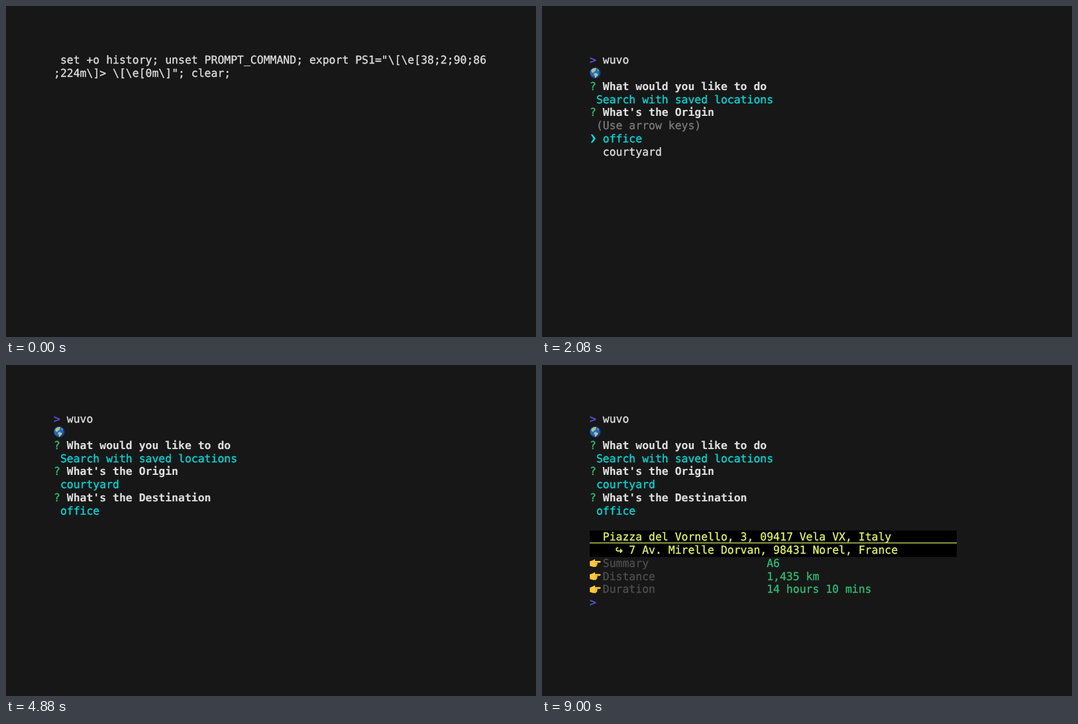
Write an HTML page that moves like this. It is 800 px wide and 500 px high and loops after 9180 ms.

```html
<!DOCTYPE html>
<html lang="en">
<head>
<meta charset="utf-8">
<title>Terminal route search</title>
<style>
  html, body { margin: 0; width: 100%; height: 100%; overflow: hidden; background: #171717; }
  svg { display: block; width: 800px; height: 500px; }
  text {
    font: 16.44px "DejaVu Sans Mono", monospace;
    white-space: pre;
    text-rendering: geometricPrecision;
    font-variant-ligatures: none;
    stroke-width: .35px;
  }
  .bold { font-weight: bold; stroke-width: .15px; }
  .crisp { shape-rendering: crispEdges; }
</style>
</head>
<body>
<svg id="stage" viewBox="0 0 800 500"></svg>
<script>
const LOOP = 9180, LEFT = 72, TOP = 71.6, CELL = 9.895, LINE = 19.78, BASE = 15.6;
const INK = '#dddddd', DIM = '#7a7a7a', GREY = '#4d4d4d', CYAN = '#04d7d7',
      GREEN = '#31bb71', LIME = '#dff068', PROMPT = '#5a56e0';

const x = col => LEFT + col * CELL;
const y = row => TOP + row * LINE;
const escape = s => s.replace(/&/g, '&amp;').replace(/</g, '&lt;').replace(/>/g, '&gt;');

const text = (col, row, s, fill = INK, cls = '') =>
  `<text class="${cls}" x="${x(col).toFixed(2)}" y="${(y(row) + BASE).toFixed(2)}"
    fill="${fill}" stroke="${fill}">${escape(s)}</text>`;
const rect = (left, top, w, h, fill, cls = 'crisp') =>
  `<rect class="${cls}" x="${left}" y="${top}" width="${w}" height="${h}" fill="${fill}"/>`;
const at = (col, row, shape) => `<g transform="translate(${x(col)} ${y(row)})">${shape}</g>`;

const cursor = (col, row) => rect(x(col), y(row), CELL, LINE, INK);
const prompt = row => text(0, row, '>', PROMPT);
const pointer = row => at(0, row,
  `<path d="M1.6 3.8h2.8l4.6 6.2-4.6 6.2H1.6L5.5 10z" fill="${CYAN}"/>`);
const hook = (col, row) => at(col, row,
  `<path d="M3.6 6.6H3a2.3 2.3 0 0 0 0 4.8h5.4M6.2 8.6l3 2.8-3 2.8"
    fill="none" stroke="${LIME}" stroke-width="1.7"/>`);

const globe = row => at(0, row, `
  <circle cx="8.3" cy="9.7" r="8.3" fill="#173f86"/>
  <circle cx="7.5" cy="9" r="6.9" fill="#2868bd"/>
  <path d="M2.2 5.5 5 3l4-.8 1.2 1.6-1.8 1.5.6 1.4-2.3 1.2-1.2 1.8-2.4-.9z" fill="#a9c58b"/>
  <path d="M7 10.2l2.5-.4 3.3 2-1 2.4-1.7 1.2-1 2-1.1-.4-.3-3-1.4-1.9z" fill="#a9c58b"/>
  <path d="M11.8 3.7l2.2 2.1-.8 1.2-2-1.3z" fill="#78a782"/>`);

const hand = row => at(0, row, `
  <path d="M.2 7.4 4.2 6l3.1-1.8 1.1.7-.6 1.8h7.5a1.3 1.3 0 0 1 0 2.6h-4.6
    q1.5.5 1.2 1.8-.2.8-1 .9.7.5.4 1.5-.3.8-1.2.8.3 1.4-1.3 1.4H5.4L.2 14.2z" fill="#ffcb3f"/>
  <path d="M7.3 9.3h8M7.4 12h3.7M7.1 14.2h2.9" fill="none" stroke="#d8902a" stroke-width=".7"/>`);

const question = (row, s) => text(0, row, '?', GREEN) + text(2, row, s, INK, 'bold');
const hint = row => text(1, row, '(Use arrow keys)', DIM);
const answer = (row, s) => text(1, row, s, CYAN);
const list = (row, items, chosen) => items.map((s, i) =>
  i === chosen ? pointer(row + i) + text(2, row + i, s, CYAN) : text(2, row + i, s)).join('');

const COMMAND = 'wuvo';
const SEARCH = 'Search with saved locations';
const PLACES = ['office', 'courtyard'];

const typed = n => prompt(0) + text(2, 0, COMMAND.slice(0, n));
const typing = n => typed(n) + cursor(2 + n, 0);
const setup = text(1, 0, 'set +o history; unset PROMPT_COMMAND; export PS1="\\[\\e[38;2;90;86')
  + text(0, 1, ';224m\\]> \\[\\e[0m\\]"; clear;');

const intro = typed(4) + globe(1);
const asked = intro + question(2, 'What would you like to do');
const menu = asked + hint(3)
  + list(4, [SEARCH, 'Search a blank new path', 'Locations'], 0)
  + rect(x(2), 220, CELL * 14, 1, DIM)
  + list(8, ['Config', 'Authenticate'], -1);
const searched = asked + answer(3, SEARCH);
const origin = searched + question(4, "What's the Origin");
const target = origin + answer(5, PLACES[1]) + question(6, "What's the Destination");
const chosen = target + answer(7, PLACES[0]);

const fact = (row, label, value) =>
  hand(row) + text(2, row, label, GREY) + text(27, row, value, GREEN);
const route = chosen
  + rect(LEFT, 250, CELL * 56, 40, '#000000')
  + text(2, 9, 'Piazza del Vornello, 3, 09417 Vela VX, Italy', LIME)
  + rect(LEFT, 268.2, CELL * 56, 1.2, LIME, '')
  + hook(4, 10) + text(6, 10, '7 Av. Mirelle Dorvan, 98431 Norel, France', LIME)
  + fact(11, 'Summary', 'A6')
  + fact(12, 'Distance', '1,435 km')
  + fact(13, 'Duration', '14 hours 10 mins');
const done = route + prompt(14);
const doneLit = done + cursor(2, 14);

// Each screen holds from its start time until the next one.
const screens = [
  [0, setup],
  [20, ''],
  [60, prompt(0)],
  [100, prompt(0) + cursor(22, 7)],
  [120, typing(0)],
  [160, typing(1)],
  [220, typing(2)],
  [280, typing(3)],
  [340, typing(4)],
  [580, typed(4) + cursor(0, 1)],
  [780, intro],
  [800, asked],
  [820, menu],
  [2060, searched],
  [2080, origin + hint(5) + list(6, PLACES, 0)],
  [2360, origin + list(6, PLACES, 1)],
  [3120, target + hint(7) + list(8, PLACES, 0)],
  [3900, target + list(8, PLACES, 1)],
  [4100, target + list(8, PLACES, 0)],
  [4300, chosen + cursor(0, 8)],
  [4880, chosen],
  [4900, route],
  [4920, doneLit],
  ...[5500, 6080, 6680, 7260, 7840, 8420, 9000].map((t, i) => [t, i % 2 ? doneLit : done])
];

const stage = document.getElementById('stage');
let shown = -1;

function draw(t) {
  let i = screens.length - 1;
  while (screens[i][0] > t) i--;
  if (i === shown) return;
  shown = i;
  stage.innerHTML = rect(0, 0, 800, 500, '#171717') + screens[i][1];
}

const start = performance.now();
function tick() {
  draw((performance.now() - start) % LOOP);
  requestAnimationFrame(tick);
}
tick();
</script>
</body>
</html>
```
